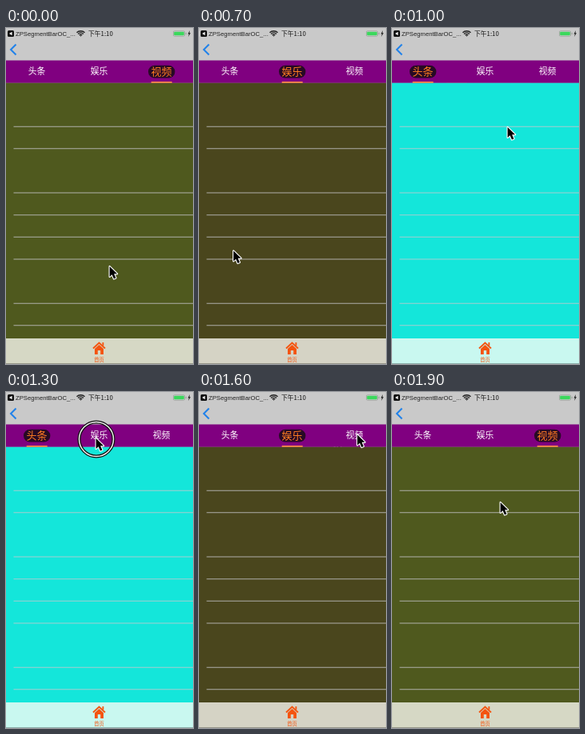
An HTML page with a canvas for the animation above (2 s loop, 234 px wide and 420 px high).

```html
<!DOCTYPE html>
<html lang="zh">
<head>
<meta charset="utf-8">
<style>
  html, body { margin: 0; height: 100%; overflow: hidden; background: #c9c9c9; }
  canvas { display: block; width: 100vw; height: 100vh; }
</style>
</head>
<body>
<canvas id="stage" width="234" height="420"></canvas>
<script>
const ctx = document.getElementById('stage').getContext('2d');
const W = 234, H = 420, LOOP = 2000, STEP = 100;
const BAR_TOP = 40.6, BAR_HEIGHT = 28, PAGE_TOP = BAR_TOP + BAR_HEIGHT, TAB_TOP = 388;
const ROW = 27.62, ROWS = 11;
const FONT = '"Noto Sans CJK SC", "Noto Sans CJK", sans-serif';
const ORANGE = '#f4540f';
const TABS = ['头条', '娱乐', '视频'];
const PAGE_COLORS = ['#14e6da', '#4a461d', '#4f591e'];
const TAP = 1300, SECOND_TAP = 1600;

// Turning points of the pointer, joined by straight moves.
const POINTER = [
  { at: 0, x: 129, y: 297 },
  { at: 200, x: 41, y: 275 },
  { at: 400, x: 170, y: 262 },
  { at: 700, x: 42.5, y: 277.5 },
  { at: 1000, x: 144, y: 123 },
  { at: TAP, x: 112, y: 57 },
  { at: SECOND_TAP, x: 197.5, y: 52.5 },
  { at: 1900, x: 135, y: 137 },
];

const clamp = v => Math.min(1, Math.max(0, v));
const mix = (a, b, f) => a + (b - a) * f;

function swipe(t, start, duration) {
  const u = clamp((t - start) / duration);
  return u * u * (3 - 2 * u);
}

// Two swipes go back a page each, two taps jump forward again.
function pageAt(t) {
  return 2 - swipe(t, 200, 374) - swipe(t, 700, 300) + (t > TAP) + (t > SECOND_TAP);
}

function pointerAt(t) {
  const i = POINTER.findLastIndex(p => p.at <= t);
  const a = POINTER[i], b = POINTER[i + 1] || { ...POINTER[0], at: LOOP };
  const f = (t - a.at) / (b.at - a.at);
  return { x: mix(a.x, b.x, f), y: mix(a.y, b.y, f) };
}

function rect(x, y, w, h, color, radius = 0) {
  ctx.fillStyle = color;
  ctx.beginPath();
  ctx.roundRect(x, y, w, h, radius);
  ctx.fill();
}

function fill(path, color) {
  ctx.fillStyle = color;
  ctx.fill(new Path2D(path));
}

function stroke(path, color, width) {
  ctx.strokeStyle = color;
  ctx.lineWidth = width;
  ctx.stroke(new Path2D(path));
}

function arc(x, y, r, width, color, from = 0, to = Math.PI * 2) {
  ctx.strokeStyle = color;
  ctx.lineWidth = width;
  ctx.beginPath();
  ctx.arc(x, y, r, from, to);
  ctx.stroke();
}

function text(str, x, y, font, color, align = 'left') {
  ctx.font = font;
  ctx.fillStyle = color;
  ctx.textAlign = align;
  ctx.fillText(str, x, y);
}

function drawHeader() {
  rect(0, 0, W, PAGE_TOP, '#c9c9c9');
  rect(2, 3, 8, 8, '#111', 1.5);
  fill('M4 7l3.5-2.2v4.4z', '#fff');
  text('ZPSegmentBarOC_...', 12, 10, '7.7px "Liberation Sans", Arial, sans-serif', '#222');
  for (let r = 2.5; r < 8; r += 2.3) {
    arc(93.5, 10.8, r, 1.4, '#222', Math.PI * 1.25, Math.PI * 1.75);
  }
  fill('M92.3 9.4h2.4l-1.2 1.4z', '#222');
  text('下午1:10', 103, 10, `500 7.8px ${FONT}`, '#111');

  rect(209, 3.5, 15, 7, '#8f9a90', 2);
  rect(209.6, 4.1, 13.8, 5.8, '#c9c9c9', 1.5);
  rect(210.2, 4.7, 12.6, 4.6, '#3bd85c', 1);
  rect(224.6, 5.7, 1, 2.6, '#8f9a90');
  fill('M230 3l-2.5 4.5h1.5l-1 3.5 3-4.7h-1.5z', '#222');
  stroke('M12.5 20.5L6 27l6.5 6.5', '#2082ea', 2);
}

function drawPages(page) {
  PAGE_COLORS.forEach((color, i) => {
    const x = Math.round((i - page) * W);
    if (Math.abs(x) >= W) return;
    rect(x, PAGE_TOP, W, H - PAGE_TOP, color);
    for (let n = 1; n <= ROWS; n++) {
      const offset = n * ROW;
      // Hairlines that fall between pixel rows vanish.
      if (Math.abs(offset - Math.round(offset)) > 0.36) continue;
      rect(x + 9.5, 67.5 + offset, W - 9.5, 1, 'rgba(200,199,204,.8)');
    }
  });
}

function drawSegments(page) {
  // The marker trails the page while it is dragged.
  const target = Math.ceil(page);
  const marker = target - (target - page) ** 2.6;
  const center = 38.7 + marker * 78;
  rect(0, BAR_TOP, W, BAR_HEIGHT, '#800080');
  rect(center - 16.7, 46.8, 33.4, 15.8, '#270a24', 7.9);
  rect(center - 13, 67, 26, 1.6, '#ff9440');
  TABS.forEach((label, i) => {
    const tint = clamp(1 - Math.abs(i - page));
    const size = 10.8 + 2.2 * clamp(1 - Math.abs(i - marker));
    const color = `rgb(255,${255 - 130 * tint},${255 - 222 * tint})`;
    text(label, 38.5 + i * 78, 54.3 + size * 0.36, `${size}px ${FONT}`, color, 'center');
  });
}

function drawTabBar() {
  rect(0, TAB_TOP, W, H - TAB_TOP, 'rgba(255,254,248,.767)');
  stroke('M109 400.5l7.5-7 7.5 7', ORANGE, 1.8);
  rect(120.5, 393, 1.8, 4, ORANGE);
  fill('M116.5 396l5.5 5v7h-3.8v-5h-3.4v5H111v-7z', ORANGE);
  text('首页', 116.5, 416.5, `500 6.3px ${FONT}`, ORANGE, 'center');
  rect(0, H - 1, W, 1, 'rgba(0,0,0,.3)');
}

function drawPointer({ x, y }, pressed) {
  if (pressed) {
    arc(x + 1, y + 2, 21.5, 4, '#111');
    arc(x + 1, y + 2, 21.5, 1.5, '#eee');
  }
  ctx.save();
  ctx.translate(x, y);
  ctx.scale(0.92, 0.92);
  ctx.lineJoin = 'round';
  const arrow = 'M.7 1v14.2l3.3-3 2.5 5.8 2.7-1.2-2.5-5.6H11z';
  stroke(arrow, '#fff', 2.4);
  fill(arrow, '#000');
  ctx.restore();
}

function draw(t) {
  drawHeader();
  drawPages(pageAt(t));
  drawSegments(pageAt(t));
  drawTabBar();
  drawPointer(pointerAt(t), t === TAP);
}

const start = performance.now();
function tick() {
  const elapsed = (performance.now() - start) % LOOP;
  draw(Math.floor(elapsed / STEP) * STEP);
  requestAnimationFrame(tick);
}
tick();
</script>
</body>
</html>
```
